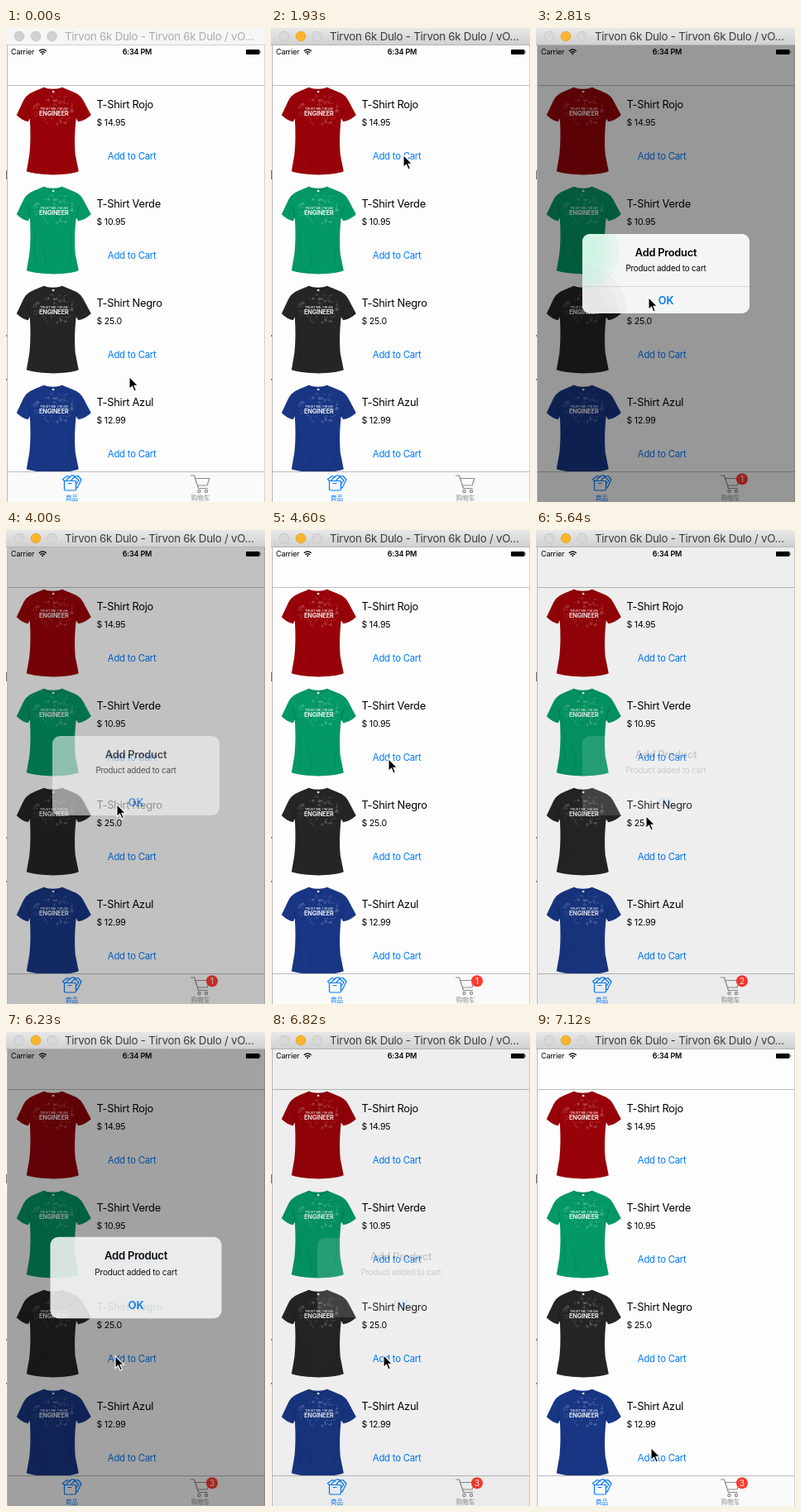
These frames come from a looping animation (313x573 px, 8000 ms). An HTML page:

```html
<!DOCTYPE html>
<html lang="en">
<head>
<meta charset="utf-8">
<title>Shop demo</title>
<style>
  html, body { margin: 0; width: 100%; height: 100%; overflow: hidden; background: #fff; }
  svg { display: block; width: 100vw; height: 100vh; }
  text { font-family: Inter, "Noto Sans", sans-serif; letter-spacing: -.02em; }
  .mid { text-anchor: middle; }
  .blue { fill: #007aff; }
  .name { font-size: 12.85px; }
  .price { font-size: 10.6px; }
  .add { font-size: 11.34px; }
  .status { font-size: 9px; }
  .tab { font: 7.56px "Noto Sans CJK SC", "Noto Sans CJK", sans-serif; letter-spacing: 0; }
  .strong { font-size: 12.85px; font-weight: 600; }
  .line { fill: none; stroke-linecap: round; stroke-linejoin: round; }
</style>
</head>
<body>
<svg viewBox="0 0 313 573" preserveAspectRatio="none">
  <defs>
    <linearGradient id="bar" x2="0" y2="1">
      <stop stop-color="#e8e8e8"/><stop offset="1" stop-color="#d1d1d1"/>
    </linearGradient>
    <clipPath id="alertShape"><rect x="56" y="249" width="202" height="96" rx="9.5"/></clipPath>
    <path id="shirt" d="M33 .5C38 3 50 3 55 .5L66 5C74 8 78 11 81 17L90 34C86 38 80 41 74.5 42L72 38C70 54 70 70 71 82L75 102C62 107.5 28 107.5 12 102L15.5 82C17 68 17 54 16 38L14 42C9 41 4 38 0 34L8 17C11 11 15 8 22 5Z"/>
    <g id="folds" class="line" stroke="#000" stroke-opacity=".2">
      <path d="M33 .5C37 7 51 7 55 .5M16 38C16 32 15 28 13 24M72 38C73 32 74 28 76 24"/>
      <path d="M22 56Q20 78 23 92M66 56Q67 78 64 95M30 70Q38 84 35 98" stroke-opacity=".1"/>
    </g>
  </defs>

  <rect width="313" height="573" fill="#fdfdfd"/>
  <g id="products"></g>

  <path d="M2 69.5H313" stroke="#bcbcbc"/>
  <rect x="2" y="536" width="311" height="37" fill="#fafafa"/>
  <path d="M2 536.5H313" stroke="#bcbcbc"/>

  <text class="status" x="6" y="32">Carrier</text>
  <g class="line" stroke="#000" stroke-width="1.3">
    <path d="M40.3 27.6Q44.3 24.2 48.3 27.6M41.9 29.6Q44.3 27.6 46.7 29.6"/>
  </g>
  <circle cx="44.3" cy="31.2" r="1"/>
  <text class="status mid" x="158.5" y="32" font-weight="600">6:34 PM</text>
  <rect x="290" y="26" width="16.5" height="6" rx="1.2"/>
  <path d="M307.4 27.6Q309 29 307.4 30.4Z"/>

  <g class="line" stroke="#007aff" stroke-width="1.2">
    <path d="M70.5 547.5H84.5V557.5Q84.5 559 83 559H72Q70.5 559 70.5 557.5ZM70.5 547.5L68.5 545.5L74 541.5L78 543"/>
    <path d="M73 546.5L77 542.5Q80 539.5 84 542L87 541.5L91 546L86 556L84.5 555M79 546.5L83 542.5L88 547L85 551M75 550.5H79"/>
  </g>
  <text class="tab mid blue" x="79.5" y="570.5">商品</text>
  <g class="line" stroke="#8c8c8c" stroke-width="1.2">
    <path d="M223.5 541H227.5L232.5 556.5H243.5M228.5 544.5H246L243 553H231.5"/>
    <circle cx="233.5" cy="560" r="1.6"/><circle cx="242" cy="560" r="1.6"/>
  </g>
  <text class="tab mid" x="235" y="570.5" fill="#8c8c8c">购物车</text>
  <g id="badge">
    <circle cx="249" cy="545.3" r="7" fill="#ff3b30"/>
    <text id="count" class="mid" x="249" y="548.8" font-size="9.8" fill="#fff"></text>
  </g>
  <path d="M312.5 21V573" stroke="#d2d2d2"/>

  <rect id="dim" x="2" y="21" width="311" height="552"/>
  <g id="alert">
    <rect x="56" y="249" width="202" height="96" rx="9.5" fill="#f5f6f6" fill-opacity=".97"/>
    <g id="settled" clip-path="url(#alertShape)">
      <path d="M56 249H258V345H56Z" fill="#f4f5f5"/>
      <g id="tint"></g>
      <path d="M56 312.5H258" stroke="#d3d5d5"/>
    </g>
    <text class="strong mid" x="157" y="276">Add Product</text>
    <text class="mid" x="157" y="294" font-size="9.83">Product added to cart</text>
    <text class="strong mid blue" x="157" y="334">OK</text>
  </g>

  <path d="M.5 21V573" stroke="#fff"/>
  <path d="M1.5 21V573" stroke="#b4b4b4"/>
  <path d="M.5 172V183M.5 371V373M.5 424V426" stroke="#777"/>
  <rect id="titlebar" width="313" height="20"/>
  <path id="edge" d="M0 20.5H313"/>
  <g id="lights" stroke-width=".8">
    <circle cx="16" cy="10" r="5.8"/>
    <circle id="middle" cx="36" cy="10" r="5.8"/>
    <circle cx="55.5" cy="10" r="5.8"/>
  </g>
  <text id="title" x="71" y="15" font-size="13.35">Tirvon 6k Dulo - Tirvon 6k Dulo / vO…</text>

  <path id="cursor" d="M0 .6V15.4L3.5 12.2L6 18L8.4 17L6 11.3H10.6Z" stroke="#fff" stroke-width="1.1"/>
</svg>
<script>
const $ = id => document.getElementById(id);
const LOOP = 8000, STEP = 148.35;

// Small white sketches printed around the slogan.
function sketches() {
  let seed = 11, d = '';
  const rnd = n => (seed = seed * 16807 % 2147483647) / 2147483647 * n;
  for (let i = 0; i < 85; i++) {
    const a = rnd(2 * Math.PI), r = Math.sqrt(rnd(1));
    const x = 45 + 25 * r * Math.cos(a), y = 28 + 19 * r * Math.sin(a);
    if (y > 23 && y < 36 && Math.abs(x - 45) < 20) continue;
    d += `M${x.toFixed(1)} ${y.toFixed(1)}`;
    d += i % 4 ? `l${(rnd(5) - 2.5).toFixed(1)} ${(rnd(5) - 2.5).toFixed(1)}` : 'a1.2 1.2 0 1 0 .1 0';
  }
  return d;
}

const print = `<path class="line" d="${sketches()}" stroke="#fff" stroke-width=".5" opacity=".4"/>
  <text class="mid" x="45" y="28" font-size="3.9" font-weight="600" fill="#fff" opacity=".8">TRUST ME, I'M AN</text>
  <text class="mid" x="45" y="34.3" font-size="7.3" font-weight="700" fill="#fff" opacity=".92">ENGINEER</text>
  <rect x="43" y="4.6" width="2.6" height="2.2" fill="#fff" opacity=".85"/>`;

$('products').innerHTML = [
  ['Rojo', '14.95', '#980309'],
  ['Verde', '10.95', '#039865'],
  ['Negro', '25.0', '#252525'],
  ['Azul', '12.99', '#183683']
].map(([name, price, color], i) => `<g transform="translate(0 ${120 * i})">
  <g transform="translate(12.8 71.3)"><use href="#shirt" fill="${color}"/><use href="#folds"/>${print}</g>
  <text class="name" x="109.5" y="97">T-Shirt ${name}</text>
  <text class="price" x="109.5" y="118">$ ${price}</text>
  <text class="add blue" x="122.8" y="158.5">Add to Cart</text></g>`).join('');

// Soft colour of the shirts showing through the settled alert.
const rings = (x, y, color, radii) => radii.map(r =>
  `<circle cx="${x}" cy="${y}" r="${r}" fill="${color}" opacity=".3"/>`).join('');
$('tint').innerHTML = rings(50, 345, '#dcdfde', [60, 50, 38]) + rings(52, 270, '#c2f0de', [48, 40, 32, 22]);

// Pointer: step, x, y; it rests until the next entry.
const path = [
  [0, 149, 421], [1, 147, 405], [2, 142, 345], [3, 147, 283], [4, 152, 262],
  [6, 152, 250], [7, 151, 220], [8, 154, 180], [9, 159, 160], [10, 160, 153],
  [17, 155, 200], [18, 144, 280], [19, 136, 325], [20, 132, 350], [21, 132, 349], [23, 132, 348],
  [25, 133, 338], [26, 134, 331], [29, 137, 300], [30, 141, 280], [31, 142, 276],
  [34, 138, 312], [35, 134, 330], [38, 133, 345], [39, 132, 375], [40, 132, 391],
  [43, 133, 370], [44, 134, 332], [46, 136, 390], [47, 139, 480], [48, 139, 502]
];
const alerts = [[15, 27], [32, 37], [41, 45]]; // open and close steps
const FADE_IN = [.4, .9], GROW = [1.13, 1.025], FADE_OUT = [.6, .15];

function alertAt(step) {
  const count = alerts.filter(([open]) => step >= open).length;
  if (!count) return { count, alpha: 0, scale: 1 };
  const [open, close] = alerts[count - 1];
  const alpha = step >= close ? FADE_OUT[step - close] ?? 0 : FADE_IN[step - open] ?? 1;
  return { count, alpha, scale: GROW[step - open] ?? 1 };
}

function setAll(id, attrs) {
  for (const key in attrs) $(id).setAttribute(key, attrs[key]);
}

function draw(step) {
  const [, x, y] = path.findLast(p => p[0] <= step);
  const { count, alpha, scale } = alertAt(step);
  const active = step >= 13;
  const gray = active ? { fill: '#d8d8d8', stroke: '#c4c4c4' } : { fill: '#d0d0d0', stroke: '#c0c0c0' };
  setAll('cursor', { transform: `translate(${x} ${y})` });
  setAll('dim', { opacity: .4 * alpha });
  setAll('alert', {
    opacity: alpha,
    transform: `translate(157 297) scale(${scale}) translate(-157 -297)`
  });
  setAll('settled', { opacity: alpha === 1 ? 1 : 0 });
  setAll('badge', { opacity: count ? 1 : 0 });
  $('count').textContent = count || '';
  setAll('titlebar', { fill: active ? 'url(#bar)' : '#f6f6f6' });
  setAll('edge', { stroke: active ? '#b3b3b3' : '#d2d2d2' });
  setAll('lights', gray);
  setAll('middle', active ? { fill: '#fdb52e', stroke: '#e0a02a' } : gray);
  setAll('title', { fill: active ? '#3c3c3c' : '#acacac' });
}

const start = performance.now();
let shown = -1;
function tick() {
  const t = (performance.now() - start) % LOOP;
  const step = Math.floor((t + 9) / STEP);
  if (step !== shown) draw(shown = step);
  requestAnimationFrame(tick);
}
tick();
</script>
</body>
</html>
```
